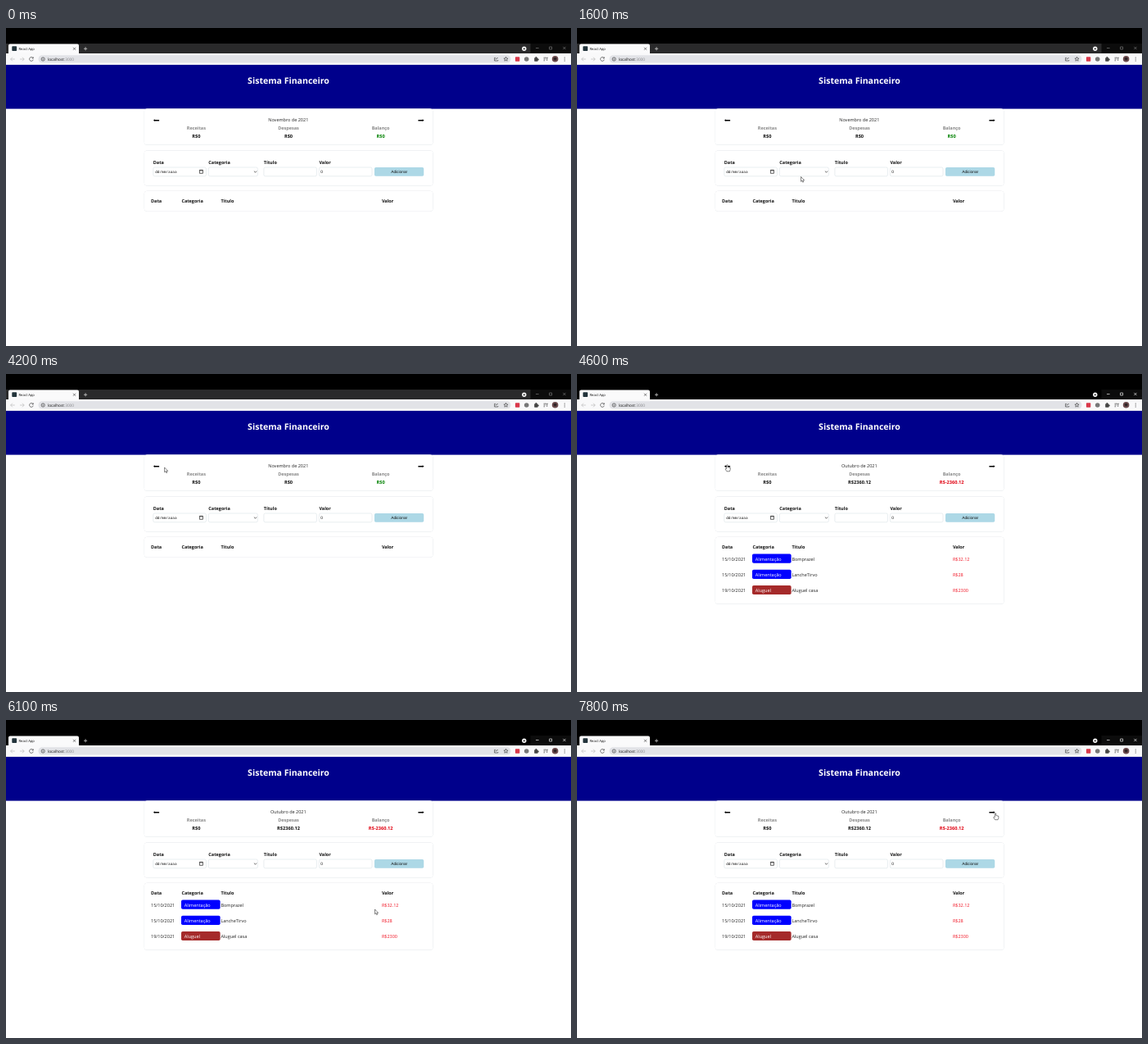
An HTML page that plays this animation: 690x388 px, repeating every 8000 ms.

```html
<!DOCTYPE html>
<html lang="pt">
<head>
<meta charset="utf-8">
<title>Sistema Financeiro</title>
<style>
  html, body { margin: 0; height: 100%; overflow: hidden; background: #fff; }
  svg { display: block; width: 100vw; height: 100vh; }
  text { font: 5.5px "Open Sans", "Noto Sans", sans-serif; text-rendering: geometricPrecision; }
  .b { font-weight: 700; }
  .mid { text-anchor: middle; }
  .sum { font-size: 5.65px; }
  .title { font-size: 10.55px; }
  .tab { font-size: 4.15px; }
  .url { font-size: 4.75px; }
  .ui { font: 4.8px "Liberation Sans", Arial, sans-serif; }
  .date { font: 4.4px "Noto Sans Mono", "Liberation Mono", monospace; }
  .card { filter: drop-shadow(0 0 .7px #c6ccd4); }
  .field { stroke: #d2dce1; stroke-width: .5; }
  .line { fill: none; stroke: #444; stroke-width: .7; }
</style>
</head>
<body>
<svg id="stage" viewBox="0 0 690 388"></svg>
<script>
const LOOP = 8000, START = 500, CLICK = 4500;
const $ = id => document.getElementById(id);

const text = (x, y, s, cls = "", fill = "#111", id = "") =>
  `<text id="${id}" x="${x}" y="${y}" class="${cls}" fill="${fill}">${s}</text>`;
const rect = (x, y, w, h, fill, r = 0, cls = "", id = "") =>
  `<rect id="${id}" x="${x}" y="${y}" width="${w}" height="${h}" rx="${r}" fill="${fill}" class="${cls}"/>`;
const dot = (x, y, r, fill) => `<circle cx="${x}" cy="${y}" r="${r}" fill="${fill}"/>`;
const line = (x, y, d, color = "#444", id = "") =>
  `<path id="${id}" transform="translate(${x} ${y})" d="${d}" class="line" style="stroke:${color}"/>`;
const each = (list, f) => list.map(f).join("");

function star(x, y) {
  const points = [...Array(10).keys()].map(i => {
    const r = i % 2 ? 1.2 : 2.7, a = i * Math.PI / 5;
    return [r * Math.sin(a), -r * Math.cos(a)];
  });
  return line(x, y, "M" + points.join("L") + "Z");
}

function browser() {
  const cross = "M-1.5-1.5l3 3m0-3l-3 3", plus = "M-2.1 0h4.2M0-2.1v4.2";
  const back = "M2.6 0h-5.2l2.3-2.3m-2.3 2.3l2.3 2.3";
  const forward = "M-2.6 0h5.2l-2.3-2.3m2.3 2.3l-2.3 2.3";
  return rect(0, 0, 690, 32, "#000") +
    rect(0, 19, 690, 13, "#2a2a2b", 0, "", "strip") +
    rect(640.5, 19, 49.5, 11.5, "#0c0c0c") +
    rect(3, 19.4, 86, 15, "#fafafb", 2) +
    rect(7.3, 22.3, 5.8, 5.8, "#23343c", 0.8) +
    text(15.5, 26.9, "React App", "tab") +
    line(83.5, 25.3, cross) + line(97.1, 25.3, plus, "#ddd") +
    dot(632.8, 25.3, 2.7, "#f1f1f1") + dot(632.8, 25.3, 0.9, "#000") +
    line(0, 24.5, "M647 0h3.6M663.6-1.5h3v3h-3zM680.3-1.6l3.2 3.2m0-3.2l-3.2 3.2", "#777", "winButtons") +
    rect(0, 31, 690, 14, "#f9f9fa") +
    line(8.2, 38, back, "#bbb") + line(19.6, 38, forward, "#bbb") +
    line(31, 38, "M2-1.4A2.4 2.4 0 1 0 2.3 .6M2.3-2.6v1.6H.6") +
    rect(39.5, 33.2, 577, 9.4, "#e2e3e7", 4.7) +
    line(45.2, 38, "M-2.1 0a2.1 2.1 0 1 0 4.2 0a2.1 2.1 0 1 0-4.2 0M0-.3v1.4M0-1.3v.5") +
    text(51, 39.8, 'localhost<tspan fill="#85868a">:3000</tspan>', "url") +
    line(598.7, 38, "M-.8-1.6h-1.3v3.6h4.2V1M-.7.6q.3-2 2.8-2") + star(610.5, 38) +
    rect(621.9, 35.3, 5.4, 5.4, "#d9384a", 0.8) +
    dot(635.7, 38, 2.8, "#777") +
    rect(645.2, 36.3, 4.4, 4.4, "#444", 0.6) + dot(647.4, 36, 1, "#444") + dot(649.8, 38.5, 1, "#444") +
    line(656.5, 38, "M0-1.8h3.6M0 0h2.4M0 1.8h1.6M4.2 2v-3.8h1.2") +
    dot(670.6, 37.8, 3.8, "#6b4a4c") + dot(670.6, 37.6, 1.9, "#2e2427") +
    each([-2, 0, 2], dy => dot(682.2, 38 + dy, 0.6, "#444"));
}

function page() {
  const column = i => 179.8 + 67.53 * i, third = i => 232.4 + 112.6 * i;
  const card = (y, h, id) => rect(168.8, y, 352.6, h, "#fff", 3.6, "card", id);
  const bar = "M0 0l2-1.4v.6h5.2v1.6H2v.6z";
  return rect(0, 44.9, 690, 53.7, "#00008b") +
    text(345, 68.3, "Sistema Financeiro", "b mid title", "#fff") +
    card(98.5, 44) + card(149.4, 43) + card(198.7, 25, "list") +
    `<path d="${bar}" transform="translate(179.9 112.7)"/>` +
    `<path d="${bar}" transform="translate(510.6 112.7) scale(-1 1)"/>` +
    text(344.8, 114.3, "", "mid", "#222", "month") +
    each(["Receitas", "Despesas", "Balanço"], (s, i) =>
      text(third(i), 124.4, s, "b mid", "#888") +
      text(third(i), 133.6, "R$0", "b mid sum", "#111", "sum" + i)) +
    each(["Data", "Categoria", "Título", "Valor"], (s, i) =>
      text(column(i), 166.3, s, "b") +
      rect(column(i), 170, i == 1 ? 60 : 64.6, 10.8, "#fff", 1.8, "field")) +
    rect(column(4), 170, 60.3, 10.7, "#add8e6", 1.8) +
    text(480.2, 177.2, "Adicionar", "ui mid") +
    text(182.2, 177.2, "dd/mm/aaaa", "date") + text(384.2, 177.3, "0", "ui") +
    line(238.4, 175.3, "M-2-2h4v4h-4zM-2-1.4h4", "#222") +
    line(304.5, 175.4, "M-1.6-.8L0 .8 1.6-.8", "#222");
}

const columns = [177, 214.4, 262.4, 458.9];
const expenses = [
  ["15/10/2021", "Alimentação", "Bomprazel", "R$32.12"],
  ["15/10/2021", "Alimentação", "LancheTirvo", "R$28"],
  ["19/10/2021", "Aluguel", "Aluguel casa", "R$2300"]
];
const badge = { "Alimentação": "#00f", "Aluguel": "#a52a2a" };
const ink = ["#222", "#fff", "#222", "#f01020"];

function table() {
  const row = (cells, i) => {
    const y = 227.5 + i * 19.15;
    return rect(214, y - 7.9, 47.6, 11.2, badge[cells[1]], 1.8) +
      each(cells, (s, c) => text(columns[c] + (c == 1 ? 3.4 : 0), y, s, "", ink[c]));
  };
  return each(["Data", "Categoria", "Título", "Valor"], (s, i) => text(columns[i], 213.4, s, "b")) +
    `<g id="rows">${each(expenses, row)}</g>`;
}

const cursor = `<g id="cursor" stroke="#222" stroke-width=".55" fill="#fff" stroke-linejoin="round">
  <path id="arrow" d="M0 0V5.8L1.3 4.7 2.2 6.7 3.1 6.3 2.3 4.3H4.1Z"/>
  <path id="hand" d="M-.7 5V.6Q0-.4.7.6V3L3.8 3.8V6L3 8.2H-.5L-2.4 5.4-1.6 4.6Z"/>
</g>`;

$("stage").innerHTML = rect(0, 0, 690, 388, "#fff") + browser() + page() + table() + cursor;

// pointer moves: begin, end, destination
const moves = [
  [500, 600, 525, 244.5],
  [700, 1600, 273.5, 181.5],
  [2300, 2500, 218.4, 173.7],
  [3100, 3200, 209.8, 174.8],
  [3300, 4200, 193.6, 114],
  [4200, 4400, 183.4, 110.6],
  [4800, 5000, 231.5, 193.5],
  [5000, 5400, 257, 294],
  [5400, 5700, 242, 267],
  [5700, 6100, 450.5, 231],
  [6100, 6600, 481, 262],
  [6600, 6900, 430, 282],
  [6900, 7600, 511, 113.5]
];
const ease = k => k * k * (3 - 2 * k);

function pointer(t) {
  let x = 534, y = 244.5;
  for (const [from, to, toX, toY] of moves) {
    const k = ease(Math.min(1, Math.max(0, (t - from) / (to - from))));
    x += (toX - x) * k;
    y += (toY - y) * k;
  }
  return [x, y];
}

const show = (id, on) => $(id).style.display = on ? "" : "none";

function draw(now) {
  const t = Math.floor(now % LOOP / 100) * 100;
  const october = t >= CLICK;
  $("strip").style.fill = october ? "#000" : "#2a2a2b";
  $("winButtons").style.stroke = october ? "#eee" : "#777";
  $("month").textContent = (october ? "Outubro" : "Novembro") + " de 2021";
  $("sum1").textContent = october ? "R$2360.12" : "R$0";
  $("sum2").textContent = october ? "R$-2360.12" : "R$0";
  $("sum2").style.fill = october ? "#e00010" : "#008000";
  $("list").setAttribute("height", october ? 81.8 : 25);
  show("rows", october);

  const [x, y] = pointer(t);
  const link = y > 106 && y < 119 && (x < 188 || x > 503);
  $("cursor").setAttribute("transform", `translate(${x} ${y})`);
  show("cursor", t >= START);
  show("hand", link);
  show("arrow", !link);
}

const begin = performance.now();
function tick() {
  draw(performance.now() - begin);
  requestAnimationFrame(tick);
}
tick();
</script>
</body>
</html>
```
